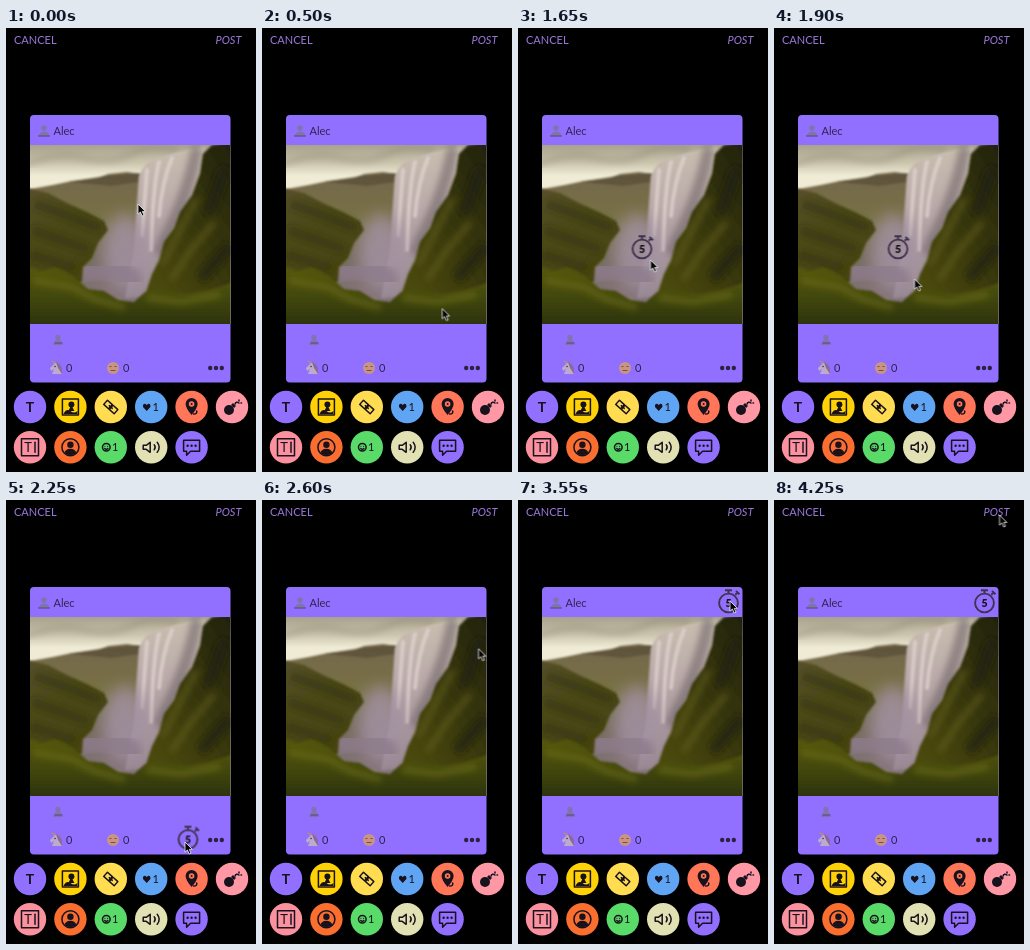
These frames come from a looping animation (250x444 px, 4.3 s). An HTML page:

```html
<!DOCTYPE html>
<html lang="en">
<head>
<meta charset="utf-8">
<title>Timed post</title>
<style>
html, body { margin: 0; width: 100%; height: 100%; overflow: hidden; background: #000; }
svg { display: block; width: 250px; height: 444px; }
text { font-family: Lato, "Open Sans", sans-serif; font-size: 11px; }
.line { fill: none; stroke: #17121c; stroke-width: 1.5; stroke-linejoin: round; stroke-linecap: round; }
.ink { fill: #17121c; }
.mid { text-anchor: middle; }
.streak { fill: none; stroke-linecap: round; }
</style>
</head>
<body>
<svg viewBox="0 0 250 444">
  <defs>
    <linearGradient id="sky" x2="0" y2="1">
      <stop offset="0" stop-color="#a8a18c"/><stop offset=".1" stop-color="#cbc5ae"/><stop offset=".17" stop-color="#f0ebd5"/>
    </linearGradient>
    <linearGradient id="hill" x2="0" y2="1">
      <stop offset="0" stop-color="#74694c"/><stop offset=".35" stop-color="#787044"/>
      <stop offset=".65" stop-color="#776d61"/><stop offset="1" stop-color="#897681"/>
    </linearGradient>
    <linearGradient id="fall" x2="0" y2="1">
      <stop offset="0" stop-color="#c9beb0"/><stop offset=".4" stop-color="#baaaa9"/><stop offset="1" stop-color="#978792"/>
    </linearGradient>
    <linearGradient id="slope" x2=".5" y2="1">
      <stop offset="0" stop-color="#57502a"/><stop offset=".4" stop-color="#4a4817"/><stop offset="1" stop-color="#45430d"/>
    </linearGradient>
    <linearGradient id="cliff" x1="1" x2=".2" y2="1">
      <stop offset="0" stop-color="#21210e"/><stop offset=".5" stop-color="#36360f"/><stop offset="1" stop-color="#4d4b11"/>
    </linearGradient>
    <linearGradient id="grass" x2="0" y2="1">
      <stop offset="0" stop-color="#57580f"/><stop offset=".5" stop-color="#42480b"/><stop offset="1" stop-color="#2b3107"/>
    </linearGradient>
    <filter id="soft" x="-20%" y="-20%" width="140%" height="140%"><feGaussianBlur stdDeviation="1"/></filter>
    <filter id="haze" x="-30%" y="-30%" width="160%" height="160%"><feGaussianBlur stdDeviation="3"/></filter>
    <filter id="mist" x="-60%" y="-60%" width="220%" height="220%"><feGaussianBlur stdDeviation="8"/></filter>
    <clipPath id="frame"><rect x="24" y="117" width="200.5" height="179"/></clipPath>
  </defs>

  <g fill="#9c79df">
    <text x="8" y="16">CANCEL</text>
    <text x="209.5" y="16" font-style="italic" font-size="10.5">POST</text>
  </g>

  <rect x="24" y="87" width="200.5" height="267.5" rx="4" fill="#9270ff"/>

  <g clip-path="url(#frame)">
    <rect x="24" y="117" width="201" height="180" fill="url(#sky)"/>
    <path d="M24 135Q50 124 78 130T125 126T170 122" class="streak" stroke="#8c8674" stroke-width="6" opacity=".4" filter="url(#haze)"/>
    <g filter="url(#soft)">
      <path d="M20 162L47 157L66 153L92 150L102 146L121 144L142 147V280H20Z" fill="url(#hill)"/>
      <path d="M62 154L98 148L134 145V154L105 158Z" fill="#554a35" opacity=".65"/>
      <path d="M133 149Q136 136 148 132L168 125L186 121L199 119L196 140L188 165L174 190L160 215L151 242L142 268L119 270L128 220Z" fill="url(#fall)"/>
    </g>
    <path d="M190 124Q183 160 167 194L154 222" class="streak" stroke="#6b5f64" stroke-width="12" opacity=".55" filter="url(#haze)"/>
    <path d="M141 142L136 207M153 134Q147 157 145 222M166 130Q156 154 153 188" class="streak" stroke="#e4d9d5" stroke-width="4" opacity=".65" filter="url(#soft)"/>
    <ellipse cx="119" cy="224" rx="23" ry="38" fill="#a291a1" opacity=".85" filter="url(#mist)"/>
    <path d="M82 243Q104 237 125 251" class="streak" stroke="#8d7c8b" stroke-width="22" opacity=".8" filter="url(#haze)"/>
    <g filter="url(#soft)">
      <path d="M20 160L42 165L61 175L83 185L98 193L102 202L92 215L86 230L77 239L76 253L53 274L20 286Z" fill="url(#slope)"/>
      <path d="M230 114L206 117L197 126L194 145L186 167L174 184L168 200L158 214L153 232L146 246L140 264L155 286H230Z" fill="url(#cliff)"/>
      <path d="M20 238L36 243L50 239L66 247L82 261L98 263L112 272L128 274L139 264L158 260L181 266L203 262L230 253V300H20Z" fill="url(#grass)"/>
    </g>
    <g class="streak" filter="url(#haze)">
      <path d="M32 177L60 187L91 199M30 203L58 213L78 220M28 228L66 239" stroke="#302d0c" stroke-width="7" opacity=".6"/>
      <path d="M190 172L174 202L158 234M207 196L185 222L167 249" stroke="#6a6420" stroke-width="6" opacity=".55"/>
      <path d="M217 145L204 181M220 222L198 247" stroke="#1e200b" stroke-width="12" opacity=".65"/>
      <path d="M30 253L66 259L88 271L116 279M144 270L175 274L211 267" stroke="#777416" stroke-width="7" opacity=".5"/>
    </g>
  </g>

  <g id="avatar" fill="#8173ac">
    <circle cx="38" cy="100" r="2.8"/><path d="M32.5 108Q33 104 38 103.5T43.5 108Z"/>
    <path d="M32.5 108H43.5" class="line" style="stroke:#55477c;stroke-width:1"/>
  </g>
  <text x="47.5" y="106.7" fill="#302352">Alec</text>
  <g fill="#8173ac">
    <circle cx="52" cy="309.5" r="2.7"/><path d="M47 317Q48 312 52 312T57 317Z"/>
    <path d="M49 315H56" class="line" style="stroke:#55477c;stroke-width:1"/>
  </g>
  <g>
    <path d="M46 346L48 341L45 343L44 340L49 335L53 336L56 346Z" fill="#bcacca"/>
    <path d="M48 336L45 332L50 334Z" fill="#b1907a"/>
    <path d="M50 334Q57 336 56 346L52 340Z" fill="#8a6999"/>
    <circle cx="49" cy="338.5" r=".8" fill="#393147"/>
  </g>
  <g>
    <circle cx="107" cy="340" r="6" fill="#c99582"/>
    <path d="M103.5 338.5h2M108.5 338.5h2M104.5 342.5h5" fill="none" stroke="#76533f" stroke-width="1.2"/>
  </g>
  <g fill="#302352"><text x="60" y="344">0</text><text x="117" y="344">0</text></g>
  <g fill="#2b203e"><circle cx="204.2" cy="340" r="2.2"/><circle cx="210" cy="340" r="2.2"/><circle cx="215.8" cy="340" r="2.2"/></g>

  <g id="buttons"></g>

  <g id="timer" opacity="0">
    <circle r="9.4" fill="none" stroke="#40334e" stroke-width="1.9"/>
    <path d="M-3.5 -12.8h7M0 -12V-9M6.8 -8.2L9 -10.5M7.5 -12l3.5 3.2" fill="none" stroke="#40334e" stroke-width="2"/>
    <text class="mid" y="3.8" font-weight="900" style="font-size:10.5px" fill="#19131f">5</text>
  </g>
  <path id="cursor" d="M0 0V10.2L2.4 8L4.2 12L6 11.2L4.3 7.4H7.4Z" fill="#050505" stroke="#eee" stroke-width=".8"/>
</svg>
<script>
const LOOP = 4300;
const line = d => `<path class="line" d="${d}"/>`;
const ink = d => `<path class="ink" d="${d}"/>`;
const dot = (x, y, r) => `<circle class="ink" cx="${x}" cy="${y}" r="${r}"/>`;
const ring = (x, y, r) => `<circle class="line" cx="${x}" cy="${y}" r="${r}"/>`;
const word = (s, x, y, size, weight = 400) =>
  `<text class="ink mid" x="${x}" y="${y}" font-weight="${weight}" style="font-size:${size}px">${s}</text>`;
const box = (x, y, w, h) => line(`M${x} ${y}h${w}v${h}h${-w}Z`);

// colour and icon of each button, six to a row
const buttons = [
  ['#9270ff', word('T', 0, 5, 14, 700)],
  ['#ffd207', box(-8, -8, 16, 16) + ink('M-7 7Q-4 1 0 4T7 4V7Z') + dot(1, -2.5, 3) + ink('M-2 4L1 -2L4 4Z')],
  ['#ffdc50', `<g transform="rotate(42)">${box(-7, -2.8, 6.5, 5.6)}${box(.5, -2.8, 6.5, 5.6)}${line('M-2 0H2')}</g>`],
  ['#60a4f4', ink('M-4.5 4L-8.2 0Q-8.5 -3.5 -6 -3.2L-4.5 -2L-3 -3.2Q-.5 -3.5 -.8 0Z') + word('1', 4.5, 4, 11)],
  ['#ff7659', ink('M0 8Q-6 1 -6 -3A6 6 0 0 1 6 -3Q6 1 0 8Z') +
    '<circle cx="0" cy="-3" r="2.8" fill="#ff7659"/>' + dot(0, -3, 1) + line('M2 7Q6 7 5 4')],
  ['#ff97a5', dot(-3, 3, 5) + ink('M-1 -2L1 -4L4 -1L2 1Z') + line('M3 -3Q4 -6 7 -4M7 -7v1M9 -4h.5')],
  ['#fb919f', box(-8.5, -8.5, 17, 17) + word('T', -2, 4.5, 13) + line('M5 -5V5')],
  ['#fa6e30', ring(0, 0, 8.5) + dot(0, -2.5, 3.2) + ink('M-6 6Q-5 1.5 0 1.5T6 6Q0 10 -6 6Z')],
  ['#59da69', `<g stroke-width="1">${ring(-4.5, 0, 3.8)}</g>` + line('M-6 1.2Q-4.5 2.8 -3 1.2') +
    dot(-5.8, -1, .6) + dot(-3.2, -1, .6) + word('1', 4.5, 4, 11)],
  ['#e1e1b4', line('M-8 -2h3L-1 -5V5L-5 2h-3ZM3 -2.5Q5 0 3 2.5M6 -5Q10 0 6 5')],
  ['#9270ff', line('M-8 -7H8V4H-1L-5 8V4H-8Z') + dot(-4, -1.5, 1.2) + dot(0, -1.5, 1.2) + dot(4, -1.5, 1.2)]
];
const $ = id => document.getElementById(id);
$('buttons').innerHTML = buttons.map(([color, icon], i) => {
  const x = 24 + i % 6 * 40.4, y = i < 6 ? 379 : 419.3;
  return `<g transform="translate(${x} ${y})"><circle r="16.2" fill="${color}"/>${icon}</g>`;
}).join('');

const play = (id, keys) => $(id).animate(keys, { duration: LOOP, iterations: Infinity });
const at = (x, y) => `translate(${x}px, ${y}px)`;

// time, x, y, easing towards the next point
play('cursor', [
  [0, 132, 176], [150, 132, 176, 'ease-in-out'],
  [850, 228, 384], [1200, 228, 384, 'ease-in-out'],
  [1600, 132.5, 232], [1800, 132.5, 232, 'ease-in-out'],
  [2150, 179, 342], [2300, 179, 342, 'ease-in'],
  [2600, 216.5, 149, 'ease-out'],
  [2850, 212, 101], [3650, 212, 101, 'ease-in-out'],
  [4100, 225.5, 15], [LOOP, 225.5, 15]
].map(([t, x, y, easing = 'linear']) => ({ offset: t / LOOP, transform: at(x, y), easing })));

// time, x, y, visible
const hold = 'steps(1, end)';
play('timer', [
  [0, 38.5, 103, 0], [950, 38.5, 103, 1], [1450, 124, 221, 1],
  [2000, 182, 339.5, 1], [2450, 210.5, 103, 0],
  [3000, 210.5, 103, 1], [LOOP, 210.5, 103, 1]
].map(([t, x, y, opacity]) => ({ offset: t / LOOP, transform: at(x, y), opacity, easing: hold })));

play('avatar', [[0, 1], [950, 0], [1450, 1], [LOOP, 1]]
  .map(([t, opacity]) => ({ offset: t / LOOP, opacity, easing: hold })));
</script>
</body>
</html>
```
